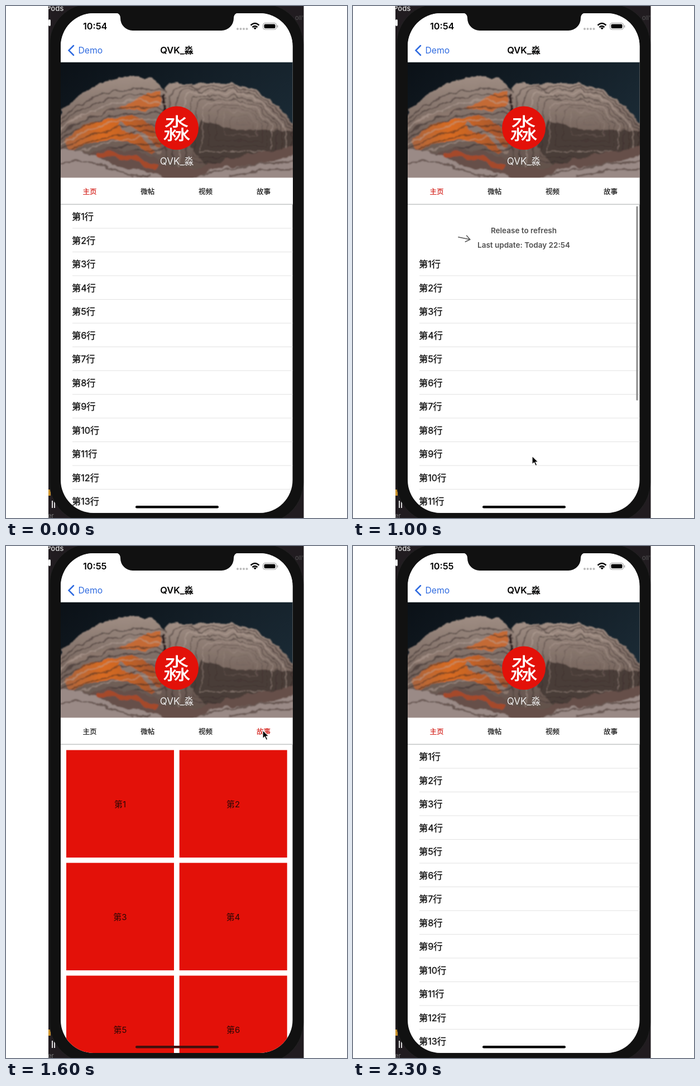
An HTML page for the animation above (2400 ms loop, 611 by 917 pixels).

```html
<!DOCTYPE html>
<html lang="zh">
<head>
<meta charset="utf-8">
<style>
  html, body { margin: 0; width: 100%; height: 100%; overflow: hidden; background: #fff; }
  svg { display: block; }
  text { font-family: Inter, "Noto Sans CJK SC", "Noto Sans CJK", sans-serif; }
  .mid { text-anchor: middle; }
  .row { font-size: 16.2px; fill: #111; stroke: #111; stroke-width: .3; }
  .cell { font-size: 15px; fill: #2b0805; }
  .tab { font-size: 12.5px; font-weight: 500; stroke-width: .25; }
  .hint { font-size: 13.5px; font-weight: 600; fill: #505050; }
  .strata { fill: none; stroke: #2f2524; stroke-width: 2.4; opacity: .5; }
  .strata .light { stroke: #bba99f; }
</style>
</head>
<body>
<svg width="611" height="917" viewBox="0 0 611 917">
  <defs>
    <linearGradient id="sky" x2="1" y2=".6">
      <stop stop-color="#0b1117"/><stop offset="1" stop-color="#1b2b36"/>
    </linearGradient>
    <linearGradient id="stone" x2="0" y2="1">
      <stop stop-color="#a08e84"/><stop offset=".4" stop-color="#7d6c64"/><stop offset="1" stop-color="#574741"/>
    </linearGradient>
    <linearGradient id="ember" x2="1" y2="0">
      <stop stop-color="#a9643e"/><stop offset=".4" stop-color="#d96b20"/><stop offset="1" stop-color="#9a5232"/>
    </linearGradient>
    <filter id="rough" x="-5%" y="-5%" width="110%" height="110%">
      <feTurbulence type="fractalNoise" baseFrequency=".045" numOctaves="3" seed="4"/>
      <feDisplacementMap in="SourceGraphic" scale="14" xChannelSelector="R" yChannelSelector="G"/>
      <feGaussianBlur stdDeviation=".9"/>
    </filter>
    <clipPath id="desk"><rect x="76" width="457.5" height="917"/></clipPath>
    <clipPath id="screen"><rect x="98" y="13" width="415.5" height="895" rx="59"/></clipPath>
    <clipPath id="photo"><rect x="98" y="101" width="416" height="206.5"/></clipPath>
    <path id="left" d="M80 320V205Q100 188 113 177T150 148Q160 136 185 134Q205 128 220 126Q238 122 250 130Q268 127 274 143L292 165L300 320Z"/>
    <path id="right" d="M270 320L282 158Q288 136 310 137T335 143Q346 138 365 138T403 139Q409 148 425 143Q446 145 457 155T489 180Q494 193 530 222V320Z"/>
  </defs>

  <g clip-path="url(#desk)">
    <rect x="76" width="458" height="917" fill="#211c20"/>
    <text x="72" y="8.5" font-size="13" font-weight="600" fill="#ccc">Pods</text>
    <text x="518" y="25" font-size="11" fill="#555">oll'</text>
    <rect x="76" y="24" width="4" height="12" rx="2" fill="#eee"/>
    <rect x="76" y="866" width="4" height="11" fill="#c9912b"/>
    <path d="M83 886v13M87 888v11" stroke="#ddd" stroke-width="2"/>
    <text x="75" y="917" font-size="11" fill="#777">er</text>
    <rect x="78" y="-4" width="455" height="930" rx="73" fill="#111" stroke="#222"/>
  </g>

  <g clip-path="url(#screen)">
    <rect x="98" y="13" width="416" height="896" fill="#fff"/>
    <g id="list">
      <text id="status" class="hint mid" x="306" y="322"></text>
      <text id="updated" class="hint mid" x="306" y="348"></text>
      <g id="spinner" stroke="#777" stroke-width="2.4" stroke-linecap="round"></g>
      <path id="arrow" d="M-11 0H11M3 -6L11 0L3 6" fill="none" stroke="#555" stroke-width="1.5"/>
    </g>
    <g id="grid"></g>
    <rect id="bar" x="507.5" width="3" rx="1.5" fill="#8b8b8b"/>

    <g id="head">
      <g clip-path="url(#photo)">
        <rect x="98" y="101" width="416" height="207" fill="url(#sky)"/>
        <g filter="url(#rough)">
          <use href="#right" fill="url(#stone)"/>
          <path d="M350 205Q400 225 450 222T530 230V270Q430 265 360 290L330 250Z" fill="#4a3c38"/>
          <use href="#left" fill="url(#stone)"/>
          <path d="M105 242Q135 208 165 206T225 194Q262 205 284 245L262 264Q215 235 180 240Q140 245 115 262Z" fill="url(#ember)"/>
          <path d="M200 184Q235 168 252 158T277 163Q284 178 262 184Q235 188 200 184Z" fill="#c46a35"/>
          <path d="M200 214Q240 222 275 262M110 212Q150 188 195 190" fill="none" stroke="#8b776d" stroke-width="8"/>
          <path d="M283 160V200" stroke="#2a1f1d" stroke-width="5"/>
          <g id="strata" class="strata"></g>
          <path d="M150 262Q210 244 270 275T400 272L530 250V315H150Z" fill="#665049"/>
          <path d="M160 268Q215 262 270 290" fill="none" stroke="#a5492c" stroke-width="9"/>
          <path d="M80 262Q125 250 165 272T265 300L300 315H80ZM330 315Q370 285 415 287T530 260V315Z" fill="#9a8a86"/>
          <path d="M90 280Q150 272 190 292T260 303M350 302Q410 286 530 277M400 303Q450 292 530 292" fill="none" stroke="#695853" stroke-width="3"/>
        </g>
      </g>
      <circle cx="306" cy="218.5" r="39" fill="#e31109"/>
      <text class="mid" x="306" y="237.5" font-size="50" font-weight="300" fill="#fff">淼</text>
      <text class="mid" x="306" y="284" font-size="17" fill="#eee">QVK_淼</text>
      <rect x="98" y="307.5" width="416" height="48" fill="#fff"/>
      <path d="M98 355.3H514" stroke="#c4c6c6" stroke-width="1.5"/>
      <g id="tabs"></g>
    </g>

    <rect x="98" y="13" width="416" height="87" fill="#fff"/>
    <path d="M98 100.3H514" stroke="#c3cbc9"/>
    <text id="clock" x="138" y="42" font-size="16.2" font-weight="600"></text>
    <path d="M121 71L112.5 79.5L121 88" fill="none" stroke="#2f6be0" stroke-width="2.5" stroke-linecap="round"/>
    <text x="129.5" y="85" font-size="15.7" fill="#2f6be0">Demo</text>
    <text class="mid" x="306" y="85" font-size="16.4" font-weight="600">QVK_淼</text>
    <path d="M415 41h17" stroke="#bbb" stroke-width="4" stroke-linecap="round" stroke-dasharray="0 5.5"/>
    <g fill="none" stroke="#000" stroke-width="2.4">
      <path d="M438.5 34.5Q446 27.5 453.5 34.5M441.5 38Q446 33.8 450.5 38"/>
      <path d="M444 39.5L446.2 41.7L448.4 39.5Q446.2 37.8 444 39.5Z" fill="#000" stroke-width="1"/>
    </g>
    <rect x="460.5" y="30.5" width="24" height="11.5" rx="3.5" fill="none" stroke="#999"/>
    <rect x="462.5" y="32.5" width="20" height="7.5" rx="2"/>
    <path d="M486.5 34.5v4" stroke="#999" stroke-width="1.5"/>
    <path d="M196 12Q205 13 205 22A22 22 0 0 0 227 44H386A22 22 0 0 0 408 22Q408 13 417 12Z" fill="#111"/>
    <rect id="home" x="232" y="895" width="149" height="4.6" rx="2.3"/>
  </g>
  <path id="cursor" d="M0 0V15L3.6 11.8L6.2 17.5L8.8 16.3L6.2 10.8H11Z" stroke="#fff" stroke-width="1.2"/>
</svg>

<script>
const $ = id => document.getElementById(id);
const STEP = 100, STEPS = 24;
const ROW = 42.5, PITCH = 202;
const TABS = ['主页', '微帖', '视频', '故事'];

// Key poses: [step, value...]; steps between are interpolated.
const PULL = [[0, 0], [1, 32], [2, 80], [3, 52], [4, 52], [5, 0], [7, -68], [8, -68],
  [10, 85], [11, 52], [12, 52], [13, 0]];
const POINTER = [[1, 268, 440], [2, 270, 558], [4, 274, 555], [7, 284, 519], [8, 284, 519],
  [10, 321, 806], [12, 318, 780], [14, 253, 328], [15, 357, 330], [16, 460, 330],
  [17, 279, 336], [18, 150, 332], [20, 150, 340]];
const TAB = [[0, 0], [14, 1], [15, 2], [16, 3], [18, 0]];

function track(keys, step) {
  const i = keys.findLastIndex(key => key[0] <= step);
  const a = keys[i], b = keys[i + 1] || a;
  const f = b === a ? 0 : (step - a[0]) / (b[0] - a[0]);
  return a.slice(1).map((v, n) => v + (b[n + 1] - v) * f);
}

const add = (id, markup) => $(id).insertAdjacentHTML('beforeend', markup);

for (let i = 0; i < 17; i++) {
  const y = 355.5 + i * ROW;
  add('list', `<text class="row" x="118" y="${y + 27.5}">第${i + 1}行</text>
    <path d="M119 ${y + ROW}H514" stroke="#e2e2e2"/>`);
}
for (let i = 0; i < 6; i++) {
  const x = 108 + i % 2 * (PITCH + .7), y = 365.5 + (i >> 1) * PITCH;
  add('grid', `<rect x="${x}" y="${y}" width="193" height="192.5" fill="#e31109"/>
    <text class="cell mid" x="${x + 96.5}" y="${y + 102}">第${i + 1}</text>`);
}
TABS.forEach((name, i) =>
  add('tabs', `<text class="tab mid" x="${150 + i * 103.8}" y="336.5">${name}</text>`));
for (let i = 0; i < 8; i++) add('spinner', `<path d="M0 -4.5V-8.5" transform="rotate(${i * 45})"/>`);

// Rock layers: sweeping bands on the left, nested outlines on the right.
for (let i = 1; i < 12; i++) {
  const s = 1 - i * .085, tone = i % 3 ? '' : 'class="light"';
  add('strata', `<path ${tone} d="M90 ${198 + 9 * i}Q190 ${112 + 13 * i} 288 ${146 + 10 * i}"/>
    <use ${tone} href="#right" transform="translate(${425 * (1 - s)} ${205 * (1 - s)}) scale(${s})"/>`);
}

const move = (id, x, y, angle = 0) =>
  $(id).setAttribute('transform', `translate(${x} ${y}) rotate(${angle})`);
const show = (id, on) => $(id).setAttribute('display', on ? 'inline' : 'none');

function render(step) {
  const [pull] = track(PULL, step);
  const tab = TAB.findLast(key => key[0] <= step)[1];
  const gridTab = tab % 2 === 1;
  const loading = [3, 4, 11, 12].includes(step);
  const top = Math.min(0, pull);

  move('list', 0, pull);
  move('head', 0, top);
  show('list', !gridTab);
  show('grid', gridTab);
  $('home').setAttribute('fill', gridTab ? '#43100c' : '#000');
  [...$('tabs').children].forEach((el, i) => {
    const color = i === tab ? '#d4221c' : '#161616';
    el.setAttribute('fill', color);
    el.setAttribute('stroke', color);
  });

  $('status').textContent = loading ? 'Loading...' : pull > 52 ? 'Release to refresh' : 'Pull down to refresh';
  $('updated').textContent = 'Last update: Today 22:' + (step < 5 ? 53 : 54);
  $('clock').textContent = step < 15 ? '10:54' : '10:55';
  show('spinner', loading);
  show('arrow', !loading);
  move('spinner', 199, 330);
  move('arrow', 199, 331, step === 10 ? 12 : pull > 52 ? -90 : 90);
  [...$('spinner').children].forEach((el, i) =>
    el.setAttribute('opacity', .3 + .7 * ((i - step + 24) % 8) / 7));

  show('bar', step > 0 && step < 13);
  $('bar').setAttribute('y', 358.5 + top);
  $('bar').setAttribute('height', loading ? 417 : 433 - Math.max(0, pull));

  const pointing = step > 0 && step < 20;
  show('cursor', pointing);
  if (pointing) move('cursor', ...track(POINTER, step));
}

let last = -1;
function tick(now) {
  const step = Math.floor(now / STEP) % STEPS;
  if (step !== last) render(last = step);
  requestAnimationFrame(tick);
}
render(0);
requestAnimationFrame(tick);
</script>
</body>
</html>
```
